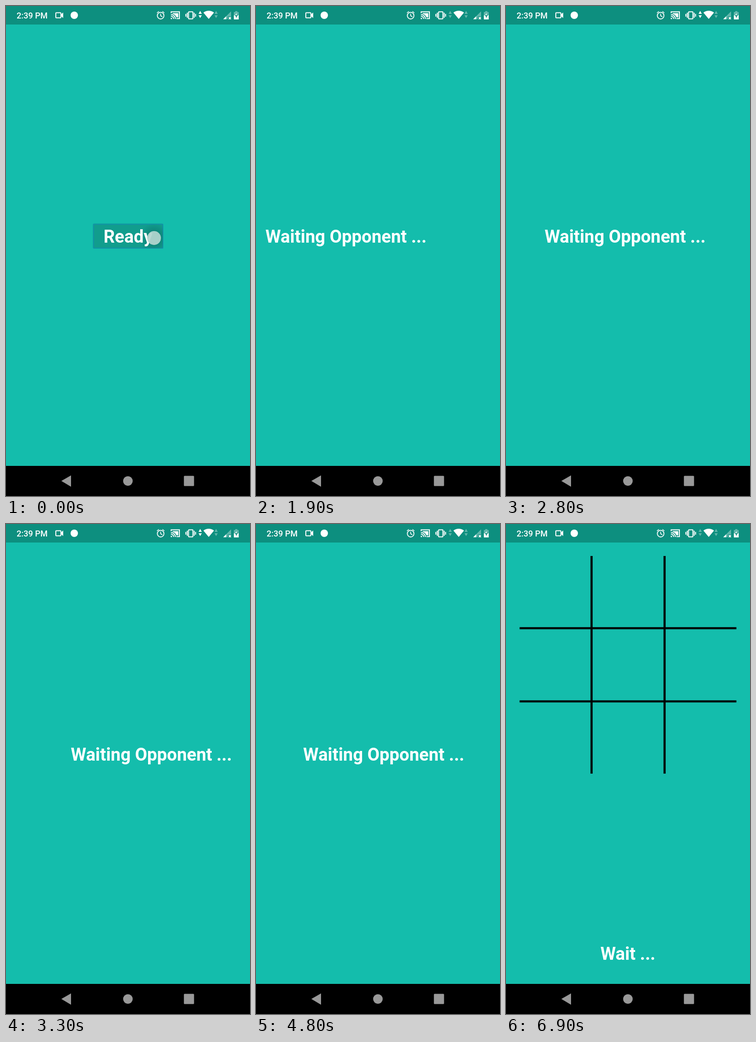
An HTML page that plays this animation: 529x1058 px, repeating every 8 s.

```html
<!DOCTYPE html>
<html lang="en">
<head>
<meta charset="utf-8">
<title>Waiting room</title>
<style>
  html, body { margin: 0; width: 100%; height: 100%; overflow: hidden; background: #14bdac; }
  svg { display: block; width: 100vw; height: 100vh; }
  text { font-family: Roboto, sans-serif; fill: #fff; }
  .big { font-size: 38.2px; font-weight: 700; }
  .mid { text-anchor: middle; }
  .clock { font-size: 18px; font-weight: 500; }
  .line { fill: none; stroke: #fff; stroke-width: 2; }
  .dim { opacity: .35; }
  .white { fill: #fff; }
</style>
</head>
<body>
<svg viewBox="0 0 529 1058" xmlns="http://www.w3.org/2000/svg">
  <defs>
    <path id="arrows" d="M-3.5 17L0 10.5L3.5 17ZM-3.5 20L0 26L3.5 20Z" fill="#fff"/>
    <radialGradient id="shade">
      <stop offset="0.5" stop-color="#0b6f68" stop-opacity=".45"/>
      <stop offset="1" stop-color="#0b6f68" stop-opacity="0"/>
    </radialGradient>
    <clipPath id="buttonArea"><rect x="190" y="471" width="150" height="52"/></clipPath>
  </defs>
  <rect width="529" height="1058" fill="#14bdac"/>

  <!-- status bar -->
  <rect width="529" height="40" fill="#0d8f7f"/>
  <text class="clock" x="23" y="27">2:39 PM</text>
  <rect class="line" x="108" y="14.6" width="11" height="10.8" rx="1"/>
  <path class="white" d="M119 18.5L124 14V26L119 21.5Z"/>
  <circle class="white" cx="148" cy="20" r="8"/>

  <g class="line">
    <circle cx="335.3" cy="20.8" r="7.2" stroke-width="1.8"/>
    <path d="M327.2 15L331.5 11.5M343.4 15L339.1 11.5M335.3 16.5V21L339 23.3" stroke-width="1.6"/>
  </g>

  <path class="line" d="M358 15.5V12.6H376V27.2H369.5" stroke-width="1.9"/>
  <path class="white" d="M361 15.5H373.5V24.5H369.5A12 12 0 0 0 361 17Z"/>
  <path class="line" d="M357.5 18.4A9.6 9.6 0 0 1 367.2 28M357.5 22A6 6 0 0 1 363.6 28" stroke-width="1.7"/>
  <path class="white" d="M357.2 25.2A3 3 0 0 1 360.2 28.2H357.2Z"/>

  <rect class="line" x="395.8" y="12.4" width="9.4" height="15.4" rx="1"/>
  <path class="line" d="M393 14.5V25.5M389.9 17V23M408 14.5V25.5M411.1 17V23"/>

  <use id="traffic" href="#arrows" x="421"/>
  <path class="white" d="M439.5 28L428 14.2A18.5 18.5 0 0 1 451 14.2Z"/>
  <use class="dim" href="#arrows" x="455.5"/>

  <path class="white dim" d="M471 28.5L488 11.5V22.5H481V28.5Z"/>
  <path class="white" d="M471 28.5L477.3 22.2V28.5Z"/>
  <path class="line" d="M483 24L487.6 28.6M487.6 24L483 28.6" stroke-width="1.5"/>

  <path class="white dim" d="M494 20V13H497V11H501.5V13H504.5V20Z"/>
  <path class="white" d="M494 20H504.5V29H494Z"/>
  <path d="M500 15L496 22H498.7V26.5L502.7 19.6H500Z" fill="#0d8f7f"/>
  <path class="white" d="M500 15L497.2 20H500Z"/>

  <!-- ready screen -->
  <g id="ready">
    <rect x="188.8" y="470.3" width="151.6" height="53" rx="3" fill="none" stroke="#10a898" stroke-width="1.5"/>
    <g id="press">
      <rect x="190" y="471.3" width="150" height="51.4" fill="#119d8d" stroke="#128fad" stroke-width="1.6"/>
      <circle cx="321" cy="501" r="32" fill="url(#shade)" clip-path="url(#buttonArea)"/>
    </g>
    <text class="big mid" x="264.5" y="510.5">Ready</text>
    <circle id="touch" cx="321" cy="501" r="15" fill="#b3d5cf" opacity=".93"/>
  </g>

  <!-- waiting screen -->
  <text id="waiting" class="big" x="0" y="510.5">Waiting Opponent ...</text>

  <!-- game screen -->
  <g id="game">
    <path d="M185.5 69V539M343.8 69V539M29.5 225H499.5M29.5 383H499.5" stroke="#000" stroke-width="4.6"/>
    <text class="big mid" x="264.3" y="941">Wait ...</text>
  </g>

  <!-- navigation bar -->
  <rect y="993" width="529" height="65" fill="#000"/>
  <g fill="#999">
    <path d="M120 1025.5L141 1013.5V1038Z"/>
    <circle cx="264.3" cy="1025.6" r="10.4"/>
    <rect x="385.7" y="1014.6" width="22" height="22" rx="1.5"/>
  </g>
</svg>
<script>
  const LOOP = 8000, STEP = 100;
  const WAIT_AT = 1800, GAME_AT = 4900;
  const TRAFFIC = [[0, 800], [2800, 4800], [5800, 6800]];

  const el = id => document.getElementById(id);
  const show = (id, on) => { el(id).style.display = on ? '' : 'none'; };
  const within = (t, [from, to]) => t >= from && t < to;

  const swing = el('waiting').animate(
    [{ transform: 'translateX(20.5px)' }, { transform: 'translateX(165.5px)' }],
    { duration: 2000, delay: 1875, iterations: Infinity, direction: 'alternate',
      easing: 'ease-in-out', fill: 'both' });
  swing.pause();

  function draw(t) {
    show('ready', t < WAIT_AT);
    show('waiting', within(t, [WAIT_AT, GAME_AT]));
    show('game', t >= GAME_AT);
    show('touch', t < 100);
    el('press').style.opacity = Math.max(0, Math.min(1, 1 - t / 300));
    el('traffic').style.opacity = TRAFFIC.some(span => within(t, span)) ? 1 : .35;
    swing.currentTime = t;
  }

  const start = performance.now();
  function tick() {
    const t = (performance.now() - start) % LOOP;
    draw(Math.floor(t / STEP) * STEP);
    requestAnimationFrame(tick);
  }
  tick();
</script>
</body>
</html>
```
